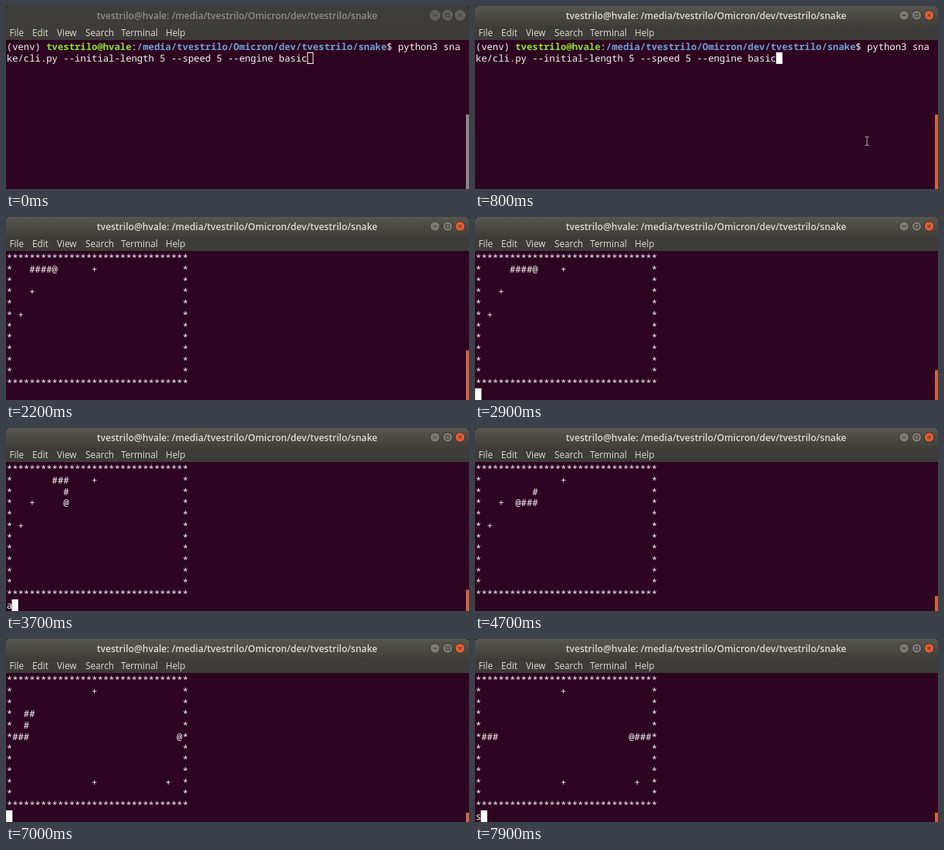
Animation of 600x237 px, one loop 8 s. Source, as an HTML page:

```html
<!DOCTYPE html>
<html lang="en">
<head>
<meta charset="utf-8">
<title>Terminal snake</title>
<style>
  html, body { margin: 0; width: 100%; height: 100%; overflow: hidden; background: #2d0520; }
  svg { display: block; width: 100vw; height: 100vh; }
  .ui { font-family: "Open Sans", "Noto Sans", sans-serif; font-size: 11.75px; fill: #dfdbd2; }
  .title { font-size: 12.1px; font-weight: 600; text-anchor: middle; }
  .term text { font-family: "Noto Sans Mono", "DejaVu Sans Mono", monospace; font-size: 12.267px; font-weight: 500;
    fill: #f6f5f5; white-space: pre; text-rendering: geometricPrecision; }
  .term .user { fill: #8ae234; font-weight: 700; }
  .term .path { fill: #729fcf; font-weight: 700; }
</style>
</head>
<body>
<svg viewBox="0 0 600 237" preserveAspectRatio="none">
  <defs>
    <linearGradient id="bar" x2="0" y2="1">
      <stop offset="0" stop-color="#56554e"/><stop offset="1" stop-color="#3f3e39"/>
    </linearGradient>
  </defs>
  <rect width="600" height="237" fill="#2d0520"/>
  <rect width="600" height="12" fill="#292724"/>
  <path id="titlebar" d="M0 26V5Q0 0 5 0H595Q600 0 600 5V26Z" fill="url(#bar)"/>
  <rect y="26" width="600" height="18" fill="#3d3c38"/>
  <text id="title" class="ui title" x="299.5" y="17">tvestrilo@hvale: /media/tvestrilo/Omicron/dev/tvestrilo/snake</text>
  <g class="ui">
    <text x="4.5" y="39">File</text><text x="34" y="39">Edit</text><text x="66" y="39">View</text>
    <text x="103" y="39">Search</text><text x="149" y="39">Terminal</text><text x="207" y="39">Help</text>
  </g>
  <g id="buttons" stroke-width="1">
    <circle cx="556" cy="12" r="6.3"/><circle cx="572.3" cy="12" r="6.3"/><circle id="close" cx="588.5" cy="12" r="6.3"/>
  </g>
  <path id="glyphs" d="M553.3 12h5.4M570 9.8h4.6v4.4h-4.6zM586.5 10l4 4M590.5 10l-4 4" fill="none" stroke-width="1"/>
  <g class="term">
    <g id="prompt">
      <text x=".8" y="57.2">(venv) <tspan class="user">tvestrilo@hvale</tspan>:<tspan class="path">/media/tvestrilo/Omicron/dev/tvestrilo/snake</tspan>$ python3 sna</text>
      <text x=".8" y="71.9">ke/cli.py --initial-length 5 --speed 5 --engine basic</text>
    </g>
    <g id="board"></g>
  </g>
  <rect id="cursor" stroke="#fff"/>
  <rect id="thumb" x="596" width="4"/>
  <path id="mouse" d="M-2.5 -5.5h1.5l1 .8 1-.8h1.5M-2.5 5.5h1.5l1-.8 1 .8h1.5M0 -4.7v9.4" fill="none" stroke="#b9b3b7"/>
</svg>
<script>
const LOOP = 8000, CELL_W = 7.36, CELL_H = 14.72, LEFT = 0.8, TOP = 44.5;
const COLS = 32, ROWS = 12, FOCUS = 600, ENTER = 1500;
const $ = id => document.getElementById(id);
const set = (el, attrs) => { for (const k in attrs) el.setAttribute(k, attrs[k]); };
const show = (el, on) => set(el, { visibility: on ? "visible" : "hidden" });

// Times at which the game redraws its board
const renders = [2100, 2450, 2800, 3200, 3500, 3800, 4150, 4500, 4800, 5100,
                 5300, 5600, 5800, 6100, 6400, 6700, 7000, 7200, 7500, 7800];
const keys = [[FOCUS, ""], [ENTER, ""], [3100, "s"], [3600, "a"], [5700, "s"], [7850, "s"]];

// Cells visited by the head, starting at the first tail cell
const trail = [[4, 1]];
for (const move of "RRRRRRDDLLLLLLLDDLLLLLL") {
  const [x, y] = trail[trail.length - 1];
  const dx = { R: 1, L: -1, D: 0 }[move];
  trail.push([(x + dx + 29) % 30 + 1, y + (move === "D" ? 1 : 0)]);
}
const meals = [[4, 3], [2, 5]].map(food =>
  trail.findIndex(cell => cell[0] === food[0] && cell[1] === food[1]));

const rows = Array.from({ length: ROWS + 1 }, (_, i) => {
  const row = document.createElementNS("http://www.w3.org/2000/svg", "text");
  set(row, { x: LEFT, y: TOP + i * CELL_H + 12.7 });
  return $("board").appendChild(row);
});

function drawBoard(count) {
  const head = count + 3;
  const eaten = meals.filter(i => i <= head).length;
  const grid = Array.from({ length: ROWS }, (_, y) => Array.from({ length: COLS }, (_, x) =>
    y % (ROWS - 1) && x % (COLS - 1) ? " " : "*"));
  const put = ([x, y], mark) => { grid[y][x] = mark; };
  [[15, 1], [4, 3], [2, 5], [28, 9], [15, 9]]
    .filter((_, i) => i === 0 || (i > eaten && i < eaten + 3))
    .forEach(food => put(food, "+"));
  trail.slice(head - 4 - eaten, head).forEach(cell => put(cell, "#"));
  put(trail[head], "@");
  grid.forEach((line, y) => { rows[y].textContent = line.join(""); });
}

function drawWindow(focused) {
  set($("titlebar"), { fill: focused ? "url(#bar)" : "#3e3d39" });
  $("title").style.fill = focused ? "#dfdbd2" : "#8e8b84";
  set($("buttons"), { fill: focused ? "#7c7a71" : "#5f5d57", stroke: focused ? "#35342f" : "#6d6b64" });
  set($("close"), { fill: focused ? "#e45b31" : "#5f5d57" });
  set($("glyphs"), { stroke: focused ? "#3a3833" : "#3b3a36" });
}

function drawCursor(t, playing, echo, lastKey) {
  const focused = t >= FOCUS;
  const [col, row] = playing ? [echo.length, 12] : t < ENTER ? [53, 1] : [0, 2];
  set($("cursor"), {
    x: LEFT + col * CELL_W - 0.1, y: TOP + row * CELL_H + 1.2,
    width: CELL_W - 0.2, height: CELL_H - 0.6, fill: focused ? "#fff" : "none"
  });
  show($("cursor"), !focused || Math.floor((t - lastKey) / 600) % 2 === 0);
}

function drawMouse(t) {
  const p = Math.min(1, Math.max(0, (t - 200) / 400));
  const rest = (1 - p) ** 2;
  set($("mouse"), { transform: `translate(${508 + 98 * rest} ${175 + 40 * rest})` });
  show($("mouse"), t >= 200 && t < ENTER);
}

function draw(t) {
  const count = renders.filter(time => time <= t).length;
  const playing = count > 0;
  const [lastKey, letter] = keys.filter(([time]) => time <= t).pop() || [0, ""];
  const echo = playing && lastKey >= renders[count - 1] ? letter : "";
  drawWindow(t >= FOCUS);
  show($("prompt"), !playing);
  show($("board"), playing);
  if (playing) drawBoard(count);
  rows[ROWS].textContent = echo;
  drawCursor(t, playing, echo, lastKey);
  drawMouse(t);

  // The thumb shrinks as each redraw adds 13 lines of scrollback
  const height = Math.max(12, 193 * 13 / (26 + 13 * count));
  set($("thumb"), { y: 237 - height, height, fill: t >= FOCUS ? "#d2613f" : "#8d8688" });
}

function tick() {
  draw(performance.now() % LOOP);
  requestAnimationFrame(tick);
}
tick();
</script>
</body>
</html>
```
